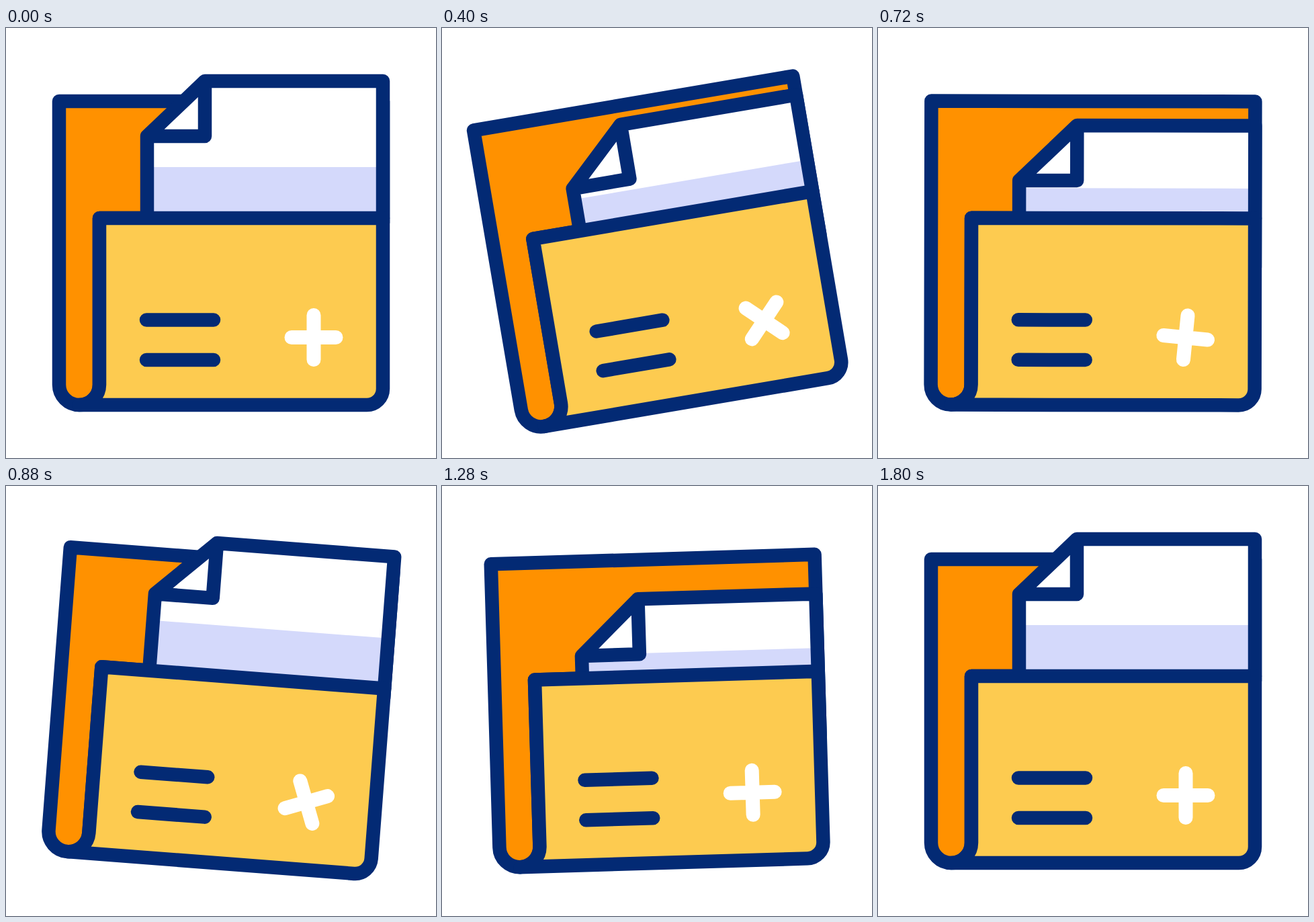
Recreate the animation shown at these times as an HTML page. Size 640 by 640 pixels, loop 2 s.

```html
<!DOCTYPE html>
<html lang="en">
<head>
<meta charset="utf-8">
<title>Folder</title>
<style>
  html, body { margin: 0; width: 100%; height: 100%; overflow: hidden; background: #fff; }
  svg { display: block; width: 100%; height: 100%; }
  .line { stroke: #032a74; stroke-width: 20.5; stroke-linecap: round; stroke-linejoin: round; }
  .plus { stroke: #fff; stroke-width: 21; stroke-linecap: round; }
</style>
</head>
<body>
<svg viewBox="0 0 640 640" fill="none">
  <g id="folder">
    <path class="line" fill="#ff9100" d="M79 109H561V283H139V531A30 30 0 0 1 79 531Z"/>
    <g id="paper">
      <path fill="#fff" d="M210 300V161L296 79H561V300Z"/>
    </g>
    <path id="band" fill="#d4d9fb" d="M215 207H556V290H215Z"/>
    <path id="outline" class="line" d="M210 290V161L296 79H561V290M296 79V161H210"/>
    <path class="line" fill="#fdcb50" d="M139 283H561V537A24 24 0 0 1 537 561H109A30 30 0 0 0 139 531Z"/>
    <path class="line" d="M209 434.5H309M209 494H309"/>
    <path id="plus" class="plus" d="M425 460.5H491M458 427.5V493.5"/>
  </g>
</svg>
<script>
  const LOOP = 2000, STEP = 40;
  const tilt = [[85, 0], [440, -10], [700, 0], [930, 5], [1170, 0], [1345, -2.5], [1535, 0]];
  const drop = [[203, 0], [568, 104], [940, 0], [1012, 0], [1366, 104], [1800, 0]];
  const bandDrop = [[207, 0], [560, 50], [589, 50], [906, 0], [1018, 0], [1375, 50], [1800, 0]];
  const spin = { start: 114, length: 975, turn: 360 };

  const byId = id => document.getElementById(id);
  const [folder, paper, band, outline, plus] =
    ["folder", "paper", "band", "outline", "plus"].map(byId);
  const smooth = p => p * p * (3 - 2 * p);

  function track(keys, t) {
    if (t <= keys[0][0]) return keys[0][1];
    for (let i = 1; i < keys.length; i++) {
      const [t0, a] = keys[i - 1], [t1, b] = keys[i];
      if (t < t1) return a + (b - a) * smooth((t - t0) / (t1 - t0));
    }
    return keys[keys.length - 1][1];
  }

  // Solves cubic-bezier(.6, 0, .4, 1) by bisection.
  function strongEase(x) {
    if (x <= 0 || x >= 1) return x <= 0 ? 0 : 1;
    let low = 0, high = 1;
    for (let i = 0; i < 24; i++) {
      const u = (low + high) / 2, v = 1 - u;
      if (1.8 * v * v * u + 1.2 * v * u * u + u ** 3 < x) low = u; else high = u;
    }
    return smooth(low);
  }

  const move = (el, value) => el.setAttribute("transform", value);

  function draw(now) {
    const t = Math.floor((now % LOOP) / STEP) * STEP;
    const y = track(drop, t);
    const turn = spin.turn * strongEase((t - spin.start) / spin.length);
    move(folder, `rotate(${track(tilt, t)} 320 320)`);
    move(paper, `translate(0 ${y})`);
    move(outline, `translate(0 ${y})`);
    move(band, `translate(0 ${track(bandDrop, t)})`);
    move(plus, `rotate(${turn} 458 460.5)`);
  }

  function tick() {
    draw(performance.now());
    requestAnimationFrame(tick);
  }
  tick();
</script>
</body>
</html>
```
